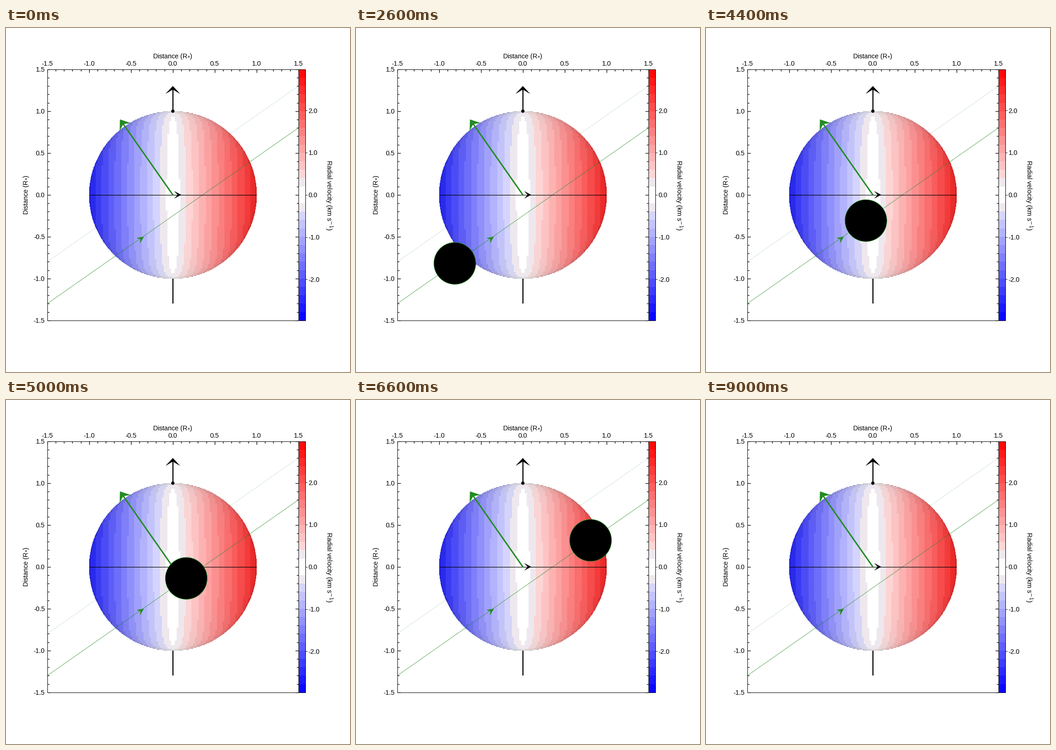
A matplotlib script for the animation above (10000 ms loop, 748 px wide and 748 px high).

```python
import matplotlib.pyplot as plt
import numpy as np
from matplotlib.animation import FuncAnimation
from matplotlib.patches import Circle, Polygon, Rectangle

plt.rcParams.update({
    "font.family": "Liberation Sans",
    "font.size": 14.4,
    "mathtext.fontset": "dejavusans",
    "axes.unicode_minus": False,
})

SIZE = 748
LEFT, RIGHT, BAR = 0.12 * SIZE, 0.85 * SIZE, 0.02 * SIZE
SPAN = RIGHT - LEFT
UNIT = SPAN / 3
MID = (LEFT + RIGHT) / 2
GREEN = "forestgreen"
FRAMES, STEP_MS = 50, 200
BANDS = 15
STAR_SPEED = 0.85  # fastest visible rotation as a share of the colour range

fig = plt.figure(figsize=(SIZE / 72, SIZE / 72), dpi=72, facecolor="white")
ax = fig.add_axes([0, 0, 1, 1])
ax.set(xlim=(0, SIZE), ylim=(SIZE, 0))
ax.axis("off")


def px(x):
    return MID + UNIT * x


def py(y):
    return MID - UNIT * y


def line(x0, y0, x1, y1, color="black", lw=1.0, z=3):
    ax.plot([x0, x1], [y0, y1], color=color, lw=lw, zorder=z,
            solid_capstyle="butt")


def frame_box(x, width):
    ax.add_patch(Rectangle((x, LEFT), width, SPAN, fill=False, lw=1, zorder=8))


def arrow_head(tip, direction, length, half, notch, color, z=5):
    """Swept-back arrow head in pixel coordinates."""
    d = np.array(direction) / np.hypot(*direction)
    n = np.array([-d[1], d[0]])
    tip = np.array(tip)
    pts = [tip, tip - length * d + half * n, tip - notch * d,
           tip - length * d - half * n]
    ax.add_patch(Polygon(pts, fc=color, ec=color, lw=0.4, zorder=z))


def band_color(shade, light, positive):
    """Blue-white-red in flat steps; shade runs from 0 (white) to 1."""
    band = np.clip(np.floor(shade * BANDS), 0, BANDS - 1)
    low = np.minimum(1 - (band + 0.5) / BANDS, light)
    rgb = np.stack([np.where(positive, light, low), low,
                    np.where(positive, low, light)], axis=-1)
    rgb[band == 0] = 1
    rgb[(band == 1) & (light > 0.9)] = (0.937, 0.91, 0.937)
    return rgb


def draw_star():
    half = 184
    cols = np.arange(-half, half) + 0.5
    rows = np.arange(-half, half, 2) + 1
    fine_x, y = np.meshgrid(cols / UNIT, rows / UNIT)
    x = np.meshgrid((np.floor(cols / 4) * 4 + 2) / UNIT, rows)[0]
    t = 1 - np.sqrt(np.clip(1 - x**2 - y**2, 0, 1))
    light = 1 - 0.067 * t - 0.16 * t**5.5
    shade = 1 - (1 - STAR_SPEED * np.abs(x)) * light
    rgb = band_color(shade, light, x > 0)
    rgb[(np.abs(x) < 0.15) & (light < 0.83)] = 0.77
    rgba = np.dstack([rgb, np.hypot(fine_x, y) <= 1.002])
    ax.imshow(rgba, extent=(MID - half, MID + half, MID + half, MID - half),
              interpolation="nearest", aspect="auto", zorder=2)


def draw_colorbar():
    v = (np.arange(2 * BANDS) + 0.5) / BANDS - 1
    rgb = band_color(np.abs(v), np.ones_like(v), v > 0)
    height = SPAN / len(v)
    for i, color in enumerate(rgb):
        ax.add_patch(Rectangle((RIGHT, RIGHT - (i + 1) * height), BAR, height,
                               fc=color, ec="none", antialiased=False, zorder=3))
    frame_box(RIGHT, BAR)
    for value in range(-2, 3):
        y = MID - 91.8 * value
        line(RIGHT + BAR, y, RIGHT + BAR + 4, y, z=8)
        ax.text(657.5, y, f"{value:.1f}", va="center_baseline")
    ax.text(702, 364, "Radial velocity (km s$^{-1}$)",
            rotation=270, ha="center", va="center")


def draw_axes():
    frame_box(LEFT, SPAN)
    for i in range(-15, 16):
        major = i % 5 == 0
        size = 7 if major else 4
        x, y = px(i / 10), py(i / 10)
        line(x, LEFT, x, LEFT + size, lw=1.3, z=8)
        line(LEFT, y, LEFT + size, y, lw=1.3, z=8)
        line(RIGHT - size, y, RIGHT, y, lw=1.3, z=8)
        if major:
            label = f"{i / 10:.1f}"
            ax.text(x, 81.5, label, ha="center", va="baseline")
            ax.text(84.5, y, label, ha="right", va="center_baseline")
    title = "Distance (R$_{*}$)"
    ax.text(MID, 66, title, ha="center", va="baseline")
    ax.text(53.5, MID, title, rotation=90, ha="right", va="center")


def draw_vectors():
    line(px(-1.5), py(-0.8), px(1.5), py(1.3), "#c4dcd0", 0.7, 1)
    line(px(-1.5), py(-1.3), px(1.5), py(0.8), GREEN, 0.7, 4)
    arrow_head((299.5, 454), (1, -0.7), 14, 6.5, 9, GREEN)

    line(px(-1), MID, px(1), MID, lw=1.2, z=4)
    line(MID, py(1), MID, py(1.3) + 4, lw=2.4, z=4)
    line(MID, py(-1), MID, py(-1.3), lw=2.4, z=4)
    ax.add_patch(Circle((MID, py(1)), 3.6, color="black", lw=0, zorder=5))
    arrow_head((MID, 126.5), (0, -1), 16, 15, 7, "black")
    arrow_head((380.5, MID), (1, 0), 14, 7.5, 7, "black")

    line(MID, MID, 253, 206, GREEN, 3, 5)
    arrow_head((248, 199), (-0.7, -1), 19, 14, 12, GREEN, 6)


draw_star()
draw_colorbar()
draw_axes()
draw_vectors()

planet = Circle((0, 0), 0.25 * UNIT, fc="black", ec=GREEN, lw=1, zorder=7)
ax.add_patch(planet)
planet.set_clip_path(Rectangle((LEFT, LEFT), SPAN, SPAN,
                               transform=ax.transData))


def update(frame):
    x = -1.5 + 3 * (frame - 4.52) / 37
    planet.center = (px(x), py(0.7 * x - 0.25))
    return [planet]


anim = FuncAnimation(fig, update, frames=FRAMES, interval=STEP_MS,
                     repeat=True, repeat_delay=0)
plt.show()
```
